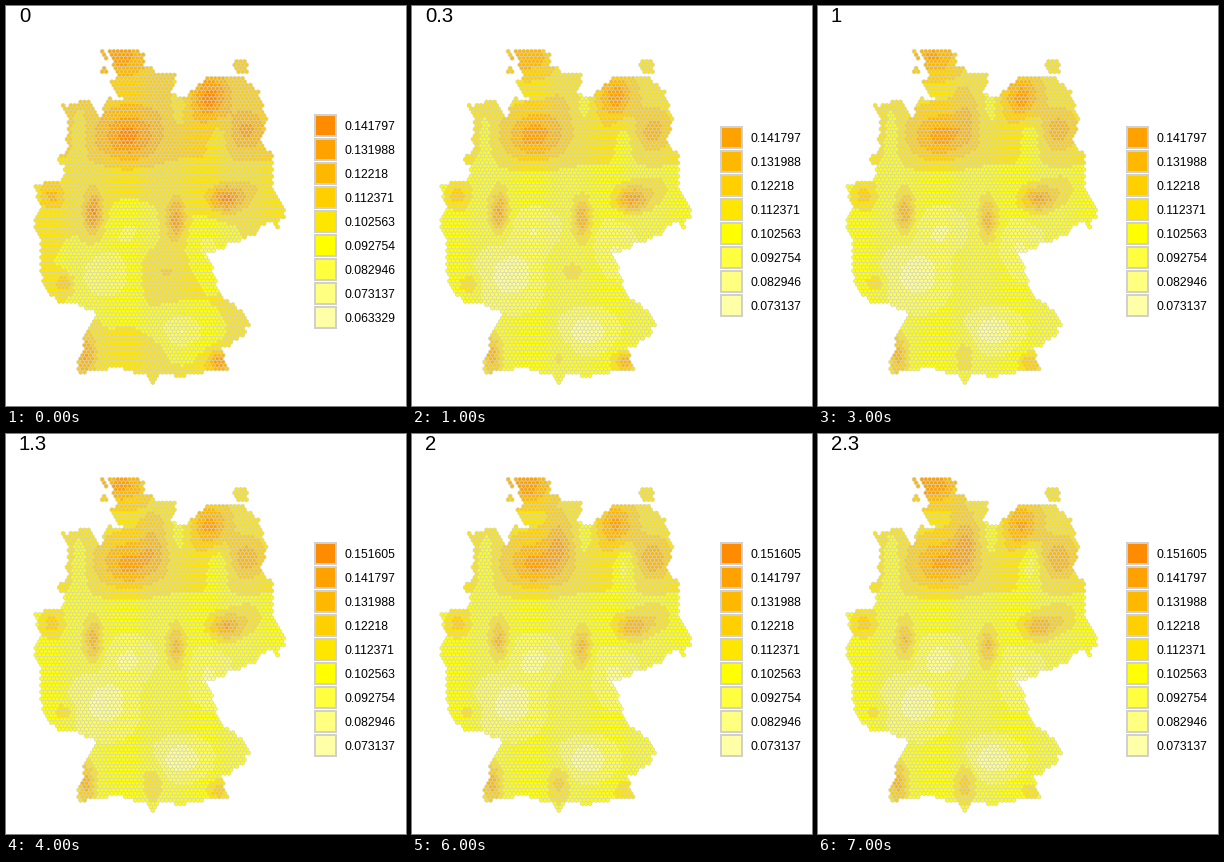
Write a matplotlib script that moves like this. It is 400x400 px and loops after 8000 ms.

```python
import numpy as np
import matplotlib.pyplot as plt
from matplotlib.animation import FuncAnimation
from matplotlib.collections import PolyCollection
from matplotlib.patches import Rectangle
from matplotlib.path import Path

SIZE, DPI = 400, 100
PX = 72 / DPI
GREY = "#d0d0d0"
PALETTE = np.array(["#ffffa8", "#ffff80", "#ffff40", "#ffff00", "#ffe600",
                    "#ffcf00", "#ffb800", "#ffa200", "#ff8c00"])
TITLES = ["0", "0.3", "0.7", "1", "1.3", "1.7", "2", "2.3"]
LABELS = ["0.063329", "0.073137", "0.082946", "0.092754", "0.102563",
          "0.112371", "0.12218", "0.131988", "0.141797", "0.151605"]

# Border, clockwise from the north-west corner
BORDER = [
    (102, 43), (139, 46), (139, 60), (152, 68), (172, 67), (164, 88),
    (180, 90), (204, 70), (236, 72), (253, 87), (262, 116), (255, 133),
    (268, 150), (268, 182), (279, 205), (273, 222), (260, 215), (247, 229),
    (200, 248), (213, 285), (245, 314), (234, 332), (216, 343), (224, 371),
    (216, 363), (175, 372), (154, 367), (148, 380), (139, 369), (108, 360),
    (74, 367), (71, 357), (80, 325), (92, 306), (68, 296), (50, 296),
    (40, 285), (34, 258), (36, 240), (28, 213), (36, 200), (28, 179),
    (51, 177), (59, 160), (50, 153), (59, 146), (63, 120), (57, 99),
    (84, 95), (96, 112), (101, 92), (119, 96), (110, 88), (103, 75),
    (111, 69),
]
# x, y, radius
ISLANDS = [(235, 61, 7.5), (97, 46, 3), (100, 52, 3), (98, 65, 3)]

# x, y, spread x, spread y, height at start and end
BUMPS = [
    (115, 50, 24, 19, 2.2, 3.2),
    (122, 130, 27, 24, 2.9, 2.6),
    (147, 112, 13, 26, 0.6, 2.5),
    (204, 92, 17, 22, 3.0, 2.6),
    (241, 125, 15, 18, 2.0, 2.4),
    (220, 193, 17, 13, 4.2, 3.4),
    (243, 185, 16, 14, 1.0, 1.4),
    (87, 206, 9, 21, 4.0, 2.9),
    (170, 213, 9, 21, 3.5, 3.0),
    (46, 190, 13, 15, 2.2, 2.1),
    (57, 278, 10, 9, 1.9, 1.2),
    (80, 350, 10, 24, 3.1, 3.2),
    (213, 357, 12, 11, 3.5, 1.2),
    (147, 350, 11, 20, 0.9, 2.4),
    (160, 266, 24, 20, 0.9, 0.2),
    (74, 130, 9, 34, -1.0, -1.5),
    (173, 96, 10, 30, -1.0, -1.3),
    (212, 132, 11, 25, -1.1, -2.0),
    (100, 270, 28, 28, -1.9, -1.8),
    (123, 225, 22, 20, -1.2, -1.7),
    (202, 243, 20, 26, -1.3, -1.5),
    (176, 325, 23, 18, -2.1, -2.2),
]


def ragged(points, rng):
    """Break each edge into short steps with a little roughness."""
    pts = np.array(points, float)
    out = []
    for p, q in zip(pts, np.roll(pts, -1, axis=0)):
        n = max(1, int(np.hypot(*(q - p)) // 5))
        for k in range(n):
            wobble = rng.uniform(-1.8, 1.8, 2) if k else 0
            out.append(p + (q - p) * k / n + wobble)
    return Path(out + out[:1])


def hex_centres(pitch=3.9):
    row = pitch * np.sqrt(3) / 2
    pts = np.array([(x + (j % 2) * pitch / 2, 42 + j * row)
                    for j in range(100) for x in np.arange(24, 284, pitch)])
    inside = ragged(BORDER, np.random.default_rng(4)).contains_points(pts)
    for x, y, r in ISLANDS:
        inside |= np.hypot(pts[:, 0] - x, pts[:, 1] - y) < r
    return pts[inside], pitch / np.sqrt(3)


def levels(i):
    """Colour class of every hexagon at step i."""
    u = (i - 1) / 6
    x, y = centres.T
    v = 2.75 + 1.4 / (1 + np.exp((y - 160) / 9))
    for bx, by, sx, sy, a, b in BUMPS:
        r = ((x - bx) / sx) ** 2 + ((y - by) / sy) ** 2
        v = v + (a + (b - a) * u) * np.exp(-r)
    if i == 0:
        v = v + 0.8
    top = 7 if 1 <= i <= 3 else 8
    return np.clip(np.rint(v), 0, top).astype(int)


fig = plt.figure(figsize=(SIZE / DPI, SIZE / DPI), dpi=DPI, facecolor="white")
ax = fig.add_axes([0, 0, 1, 1])
ax.set(xlim=(0, SIZE), ylim=(SIZE, 0))
ax.axis("off")

centres, radius = hex_centres()
angles = np.radians(np.arange(30, 390, 60))
corner = radius * np.column_stack([np.cos(angles), np.sin(angles)])
tiles = PolyCollection(centres[:, None] + corner, edgecolors=GREY,
                       linewidths=0.6 * PX)
ax.add_collection(tiles)

title = ax.text(13, 15.5, "", family="Liberation Sans", size=20.3 * PX)
keys = [ax.add_patch(Rectangle((309, 0), 21, 21, ec=GREY, lw=2 * PX))
        for _ in PALETTE]
names = [ax.text(338.5, 0, "", family="Liberation Sans", size=12.2 * PX)
         for _ in PALETTE]


def update(i):
    tiles.set_facecolor(PALETTE[levels(i)])
    title.set_text(TITLES[i])
    rows = 8 if 1 <= i <= 3 else 9
    first = 0 if i == 0 else 1
    for k, (key, name) in enumerate(zip(keys, names)):
        shown = k < rows
        key.set_visible(shown)
        name.set_visible(shown)
        if shown:
            mid = 215.5 + 12 * (rows - 1) - 24 * k
            key.set_y(mid - 10.5)
            key.set_facecolor(PALETTE[k])
            name.set_y(mid + 4.5)
            name.set_text(LABELS[first + k])
    return [tiles, title, *keys, *names]


anim = FuncAnimation(fig, update, frames=len(TITLES), interval=1000,
                     repeat=True, repeat_delay=0)
plt.show()
```
